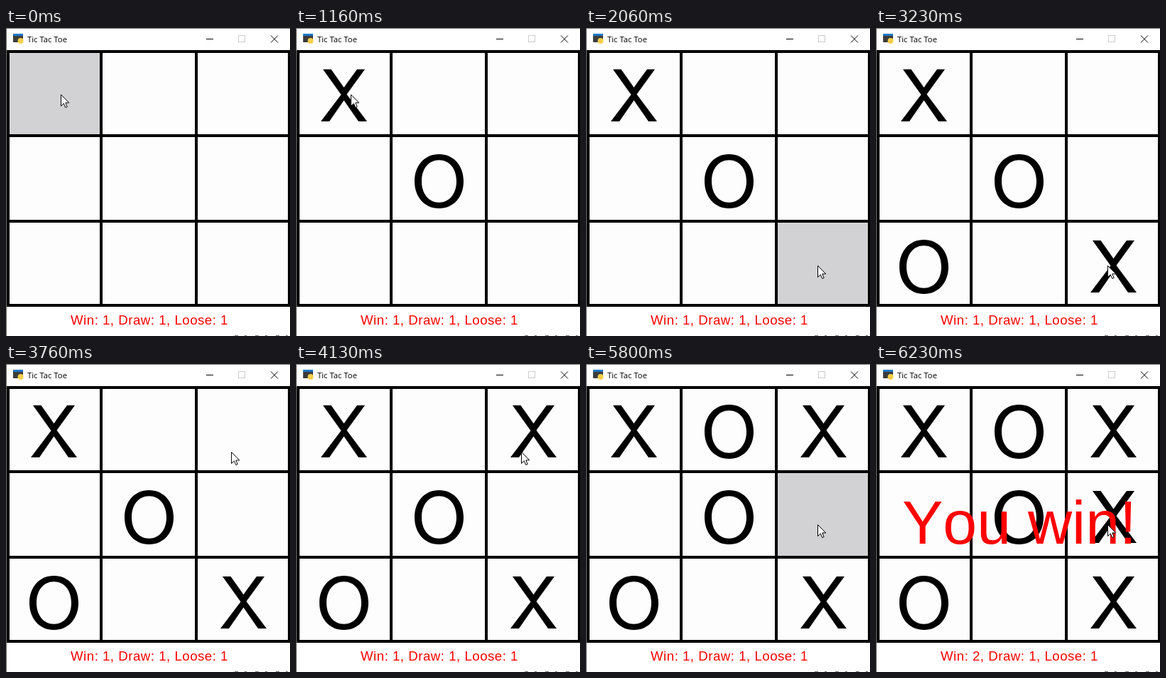
Animation of 400x432 px, one loop 7630 ms. Source, as an HTML page:

```html
<!DOCTYPE html>
<html lang="en">
<head>
<meta charset="utf-8">
<title>Tic Tac Toe</title>
<style>
  html, body { margin: 0; width: 100%; height: 100%; overflow: hidden; background: #fff; }
  svg { display: block; width: 400px; height: 432px; }
  text { white-space: pre; }
  .title { font: 11.3px "Open Sans", "Noto Sans", sans-serif; }
  .score { font: 18.67px "Liberation Sans", Arial, sans-serif; letter-spacing: .5px; fill: #f00; }
  .win { font: 86px "Liberation Sans", Arial, sans-serif; font-kerning: none; fill: #f00; }
  .cell { fill: #d2d2d4; }

  .timed { animation: 7630ms step-end infinite; }
  .pointer { animation: move 7630ms linear infinite; }

  /* Player and computer moves, in order of play */
  .m1 { animation-name: m1; }
  .m2 { animation-name: m2; }
  .m3 { animation-name: m3; }
  .m4 { animation-name: m4; }
  .m5 { animation-name: m5; }
  .m6 { animation-name: m6; }
  .m7 { animation-name: m7; }
  .end { animation-name: end; }
  .old { animation-name: old; }
  @keyframes m1 { 0% { visibility: hidden } 4.324%, to { visibility: visible } }
  @keyframes m2 { 0% { visibility: hidden } 15.203%, to { visibility: visible } }
  @keyframes m3 { 0% { visibility: hidden } 31.454%, to { visibility: visible } }
  @keyframes m4 { 0% { visibility: hidden } 42.332%, to { visibility: visible } }
  @keyframes m5 { 0% { visibility: hidden } 54.128%, to { visibility: visible } }
  @keyframes m6 { 0% { visibility: hidden } 65.530%, to { visibility: visible } }
  @keyframes m7 { 0% { visibility: hidden } 76.802%, to { visibility: visible } }
  @keyframes end { 0% { visibility: hidden } 81.651%, to { visibility: visible } }
  @keyframes old { 0% { visibility: visible } 76.802%, to { visibility: hidden } }

  /* Cells turn grey while the button is held */
  .p1 { animation-name: p1; }
  .p2 { animation-name: p2; }
  .p3 { animation-name: p3; }
  .p4 { animation-name: p4; }
  @keyframes p1 { 0% { visibility: visible } 4.324%, to { visibility: hidden } }
  @keyframes p2 { 0%, 31.454%, to { visibility: hidden } 26.998% { visibility: visible } }
  @keyframes p3 { 0%, 54.128%, to { visibility: hidden } 51.507% { visibility: visible } }
  @keyframes p4 { 0%, 76.802%, to { visibility: hidden } 75.491% { visibility: visible } }

  @keyframes move {
    0% { transform: translate(77px, 93px) }
    20.052% { transform: translate(77px, 93px); animation-timing-function: cubic-bezier(.2, .5, .3, 1) }
    26.081% { transform: translate(326px, 333px) }
    46.265% { transform: translate(326px, 333px); animation-timing-function: cubic-bezier(.2, .5, .3, 1) }
    49.410% { transform: translate(317px, 123px) }
    70.380% { transform: translate(317px, 123px); animation-timing-function: cubic-bezier(.2, .5, .3, 1) }
    75.098%, to { transform: translate(326px, 225px) }
  }
</style>
</head>
<body>
<svg viewBox="0 0 400 432">
  <defs>
    <path id="x" d="M-32.5 36L-4-1.5-29.5-37H-18L-4.5-18 0-11.5 4.5-18 18.5-37H29.5L4-2 32.5 36H20.5L0 6.5-20.5 36Z"/>
    <path id="o" d="M-34.5 0C-34.5-22-20.5-38 0-38S34.5-22 34.5 0 20.5 38 0 38-34.5 22-34.5 0Z
      M-24.5 0C-24.5 17.5-14.5 29.7 0 29.7S24.5 17.5 24.5 0 14.5-29.7 0-29.7-24.5-17.5-24.5 0Z"/>
  </defs>

  <!-- Window -->
  <rect width="400" height="432" fill="#fff"/>
  <path d="M0 .5H400M.5 0V432" stroke="#707070"/>
  <path d="M322 431.5H400" stroke="#777" stroke-dasharray="5 9 3 12"/>
  <rect x="10" y="8" width="14" height="12" fill="#3c3c3c"/>
  <rect x="10" y="8" width="14" height="3" fill="#1a78c8"/>
  <circle cx="20.5" cy="18" r="4" fill="#f5cf4c"/>
  <text class="title" x="30" y="20">Tic Tac Toe</text>
  <g fill="none" stroke="#000">
    <path d="M282 15.5H292M373 10.500L383 20.500M383 10.500L373 20.500"/>
    <rect x="327.500" y="10.500" width="9" height="9" stroke="#ccc"/>
  </g>

  <!-- Board -->
  <rect x="1" y="31" width="399" height="360"/>
  <path fill="#fdfdfd" d="M5 35H132V149H5ZM136 35H266V149H136ZM270 35H397V149H270Z
    M5 153H132V269H5ZM136 153H266V269H136ZM270 153H397V269H270Z
    M5 273H132V387H5ZM136 273H266V387H136ZM270 273H397V387H270Z"/>
  <g class="cell">
    <rect class="timed p1" x="5" y="35" width="127" height="114"/>
    <rect class="timed p2" x="270" y="273" width="127" height="114"/>
    <rect class="timed p3" x="270" y="35" width="127" height="114"/>
    <rect class="timed p4" x="270" y="153" width="127" height="116"/>
  </g>
  <use class="timed m1" href="#x" x="67.5" y="95"/>
  <use class="timed m2" href="#o" x="201.5" y="215"/>
  <use class="timed m3" href="#x" x="334.5" y="335"/>
  <use class="timed m4" href="#o" x="67.5" y="335"/>
  <use class="timed m5" href="#x" x="334.5" y="95"/>
  <use class="timed m6" href="#o" x="201.5" y="95"/>
  <use class="timed m7" href="#x" x="334.5" y="215"/>

  <text class="score timed old" x="91" y="416">Win: 1, Draw: 1, Loose: 1</text>
  <text class="score timed m7" x="91" y="416">Win: 2, Draw: 1, Loose: 1</text>
  <text class="win timed end" x="37" y="252">You win!</text>

  <path class="pointer" d="M.5.5V16.500L4.300 12.900 6.800 18.500 9.200 17.500 6.800 11.900H11.800Z" fill="#fff" stroke="#000"/>
</svg>
</body>
</html>
```
